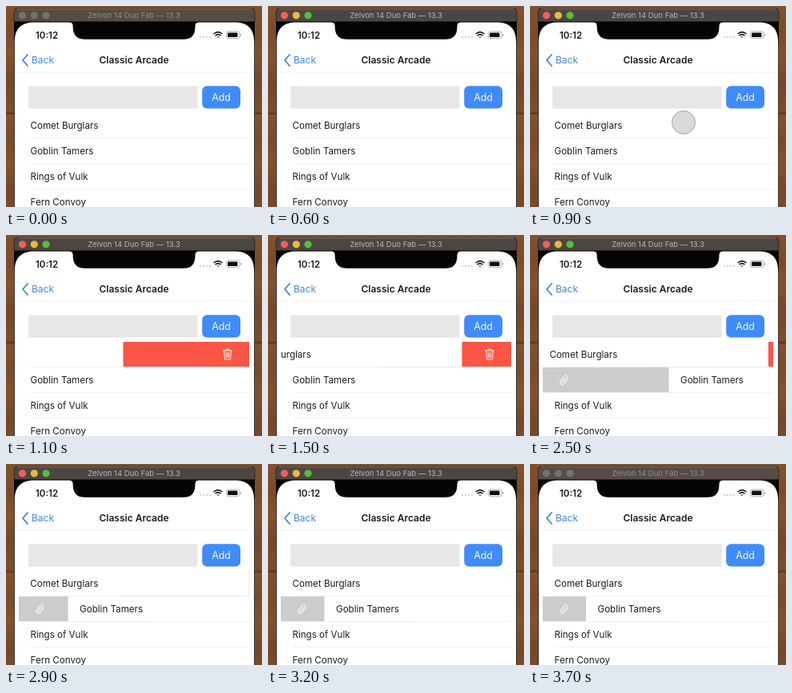
Animation, 320 px wide and 252 px high, one loop 3.8 s. Source, as an HTML page:

```html
<!DOCTYPE html>
<html lang="en">
<head>
<meta charset="utf-8">
<title>Swipeable list</title>
<style>
  html, body { margin: 0; width: 100%; height: 100%; overflow: hidden; background: #7a4b2a; }
  svg { display: block; width: 100vw; height: 100vh; }
  text { font-family: Inter, Roboto, "Liberation Sans", sans-serif; font-size: 12px; fill: #1c1c1c; }
  .row text { font-size: 11.6px; }
  .bold { font-weight: 600; }
  .mid { text-anchor: middle; }
  .blue { fill: #4289dc; }
  .line { stroke: #ebebed; stroke-width: .7; }
  .icon { fill: none; stroke: #fff; stroke-width: .9; stroke-linecap: round; stroke-linejoin: round; }
  #bar { fill: #4c4643; }
  #caption { font-size: 9.5px; fill: #b9b5b2; }
  .idle #bar { fill: #554c47; }
  .idle #caption { fill: #928a85; }
  .idle .light { fill: #77706b; }
</style>
</head>
<body>
<svg id="stage" class="idle" viewBox="0 0 320 252">
  <defs>
    <linearGradient id="wood" x2="0" y2="136" gradientUnits="userSpaceOnUse" spreadMethod="repeat">
      <stop offset="0" stop-color="#82522e"/>
      <stop offset=".25" stop-color="#7a4b29"/>
      <stop offset=".45" stop-color="#83532f"/>
      <stop offset=".7" stop-color="#754727"/>
      <stop offset=".97" stop-color="#7d4e2b"/>
      <stop offset="1" stop-color="#553319"/>
    </linearGradient>
    <clipPath id="list"><rect x="16" y="133" width="288" height="119"/></clipPath>
  </defs>

  <rect width="320" height="252" fill="url(#wood)"/>

  <!-- window -->
  <path id="bar" d="M10 20V7q0-4 4-4H307q4 0 4 4V20z" stroke="#241a14" stroke-width=".7"/>
  <path d="M14 3.8H307" stroke="#857b75" stroke-width=".8"/>
  <circle class="light" cx="20.5" cy="11.8" r="4.6" fill="#fb5b55"/>
  <circle class="light" cx="35.3" cy="11.8" r="4.6" fill="#e6bb3b"/>
  <circle class="light" cx="50" cy="11.8" r="4.6" fill="#55bf3b"/>
  <text id="caption" class="mid" x="160" y="15.2">Zelvon 14 Duo Fab — 13.3</text>
  <rect x="10" y="19.5" width="301" height="233" fill="#050505"/>
  <path fill="#fff" d="M10.8 252V46C10.8 28.5 18.5 20.6 36 20.6H79Q83.6 20.6 83.6 25C83.6 36.4 88 41.7 99 41.7H221.5C232.5 41.7 236.5 36.4 236.5 25Q236.5 20.6 241.5 20.6H285C302.5 20.6 310.2 28.5 310.2 46V252z"/>

  <!-- status bar -->
  <text class="bold" x="37" y="40.5" style="font-size:11.5px">10:12</text>
  <g fill="#c9c9c9">
    <circle cx="243" cy="39" r="1.1"/><circle cx="247" cy="39" r="1.1"/>
    <circle cx="251" cy="39" r="1.1"/><circle cx="255" cy="39" r="1.1"/>
  </g>
  <g fill="none" stroke="#111" stroke-width="1.6">
    <path d="M259.6 35q5.4-4.8 10.8 0M261.6 37.2q3.4-3 6.8 0"/>
    <path d="M263.4 38.4h3.2l-1.6 1.6z" fill="#111" stroke="none"/>
  </g>
  <rect x="275.5" y="32" width="16.5" height="8.6" rx="2.4" fill="none" stroke="#999" stroke-width=".8"/>
  <rect x="277" y="33.5" width="12.5" height="5.6" rx="1.2" fill="#111"/>
  <path d="M293 35v2.8q1.2-.4 1.2-1.4t-1.2-1.4z" fill="#999"/>

  <!-- header and form -->
  <path d="M27 61l-6 7 6 7" fill="none" stroke="#4289dc" stroke-width="1.9" stroke-linecap="round" stroke-linejoin="round"/>
  <text class="blue" x="32" y="72">Back</text>
  <text class="bold mid" x="160" y="72">Classic Arcade</text>
  <path class="line" d="M11 83H310"/>
  <rect x="28" y="100.5" width="211.5" height="28" fill="#e8e6e9"/>
  <rect x="245.2" y="100.3" width="47.8" height="28.2" rx="6" fill="#3f8bfa"/>
  <text class="mid" x="269" y="119" style="font-size:12.4px;fill:#f4f8ff">Add</text>

  <!-- list -->
  <g clip-path="url(#list)">
    <g id="remove">
      <rect x="140" y="134" width="164" height="31.3" fill="#fb5545"/>
      <g class="icon" transform="translate(277 149.5)">
        <path d="M-5.5-4.5H5.5M-2-4.5V-6.5H2V-4.5M-4.4-4.5L-3.6 6.5H3.6L4.4-4.5M0-2V4M-2-2L-1.7 4M2-2L1.7 4"/>
      </g>
    </g>
    <g id="attach">
      <rect x="16" y="166" width="164" height="31.3" fill="#cccbcd"/>
      <path class="icon" transform="translate(42.5 182) rotate(38)" d="M3-4V3.2a3 3 0 0 1-6 0V-4.2a2.1 2.1 0 0 1 4.2 0V2.8a1.1 1.1 0 0 1-2.2 0V-3"/>
    </g>
    <g class="row" id="first"><rect x="16" y="133.5" width="288" height="32" fill="#fff"/><text x="30.5" y="154.3">Comet Burglars</text></g>
    <g class="row" id="second"><rect x="16" y="165.8" width="288" height="31.7" fill="#fff"/><text x="30.5" y="186.3">Goblin Tamers</text></g>
    <g class="row"><text x="30.5" y="218">Rings of Vulk</text><text x="30.5" y="249.7">Fern Convoy</text></g>
    <path class="line" d="M31 165.7H304M31 197.6H304M31 229.4H304"/>
  </g>
  <circle id="touch" r="14.5" fill="#d8d8d8" fill-opacity=".95" stroke="#a6a6a6"/>
</svg>
<script>
  const LOOP = 3800, TICK = 100, OPEN = 54, PULL = 157.5;
  const $ = id => document.getElementById(id);
  const slide = (id, x) => $(id).setAttribute("transform", `translate(${x.toFixed(2)} 0)`);

  // Critically damped spring: 1 at rest, easing to 0.
  const spring = ms => {
    const z = Math.max(0, ms) * 0.0107;
    return (1 + z) * Math.exp(-z);
  };

  // Drag from start to release, then settle at the open width.
  const swipe = (t, start, release) => {
    if (t <= start) return 0;
    if (t < release) {
      const p = (t - start) / (release - start);
      return PULL * p * p * (3 - 2 * p);
    }
    return OPEN + (PULL - OPEN) * spring(t - release);
  };

  function draw(t) {
    const first = -swipe(t, 900, 1100) * spring(t - 2150);
    const second = swipe(t, 2200, 2500);
    $("stage").classList.toggle("idle", t < 600 || t >= 3700);
    slide("first", first);
    slide("second", second);
    $("remove").style.display = first < -0.02 ? "" : "none";
    $("attach").style.display = second > 0 ? "" : "none";

    const onFirst = t >= 700 && t < 1100, onSecond = t >= 2200 && t < 2500;
    const touch = $("touch");
    touch.style.display = onFirst || onSecond ? "" : "none";
    touch.setAttribute("cx", onFirst ? 192 + first : 23 + second);
    touch.setAttribute("cy", onFirst ? 146 : 182.5);
  }

  function frame() {
    draw(Math.floor(performance.now() % LOOP / TICK) * TICK);
    requestAnimationFrame(frame);
  }
  frame();
</script>
</body>
</html>
```
